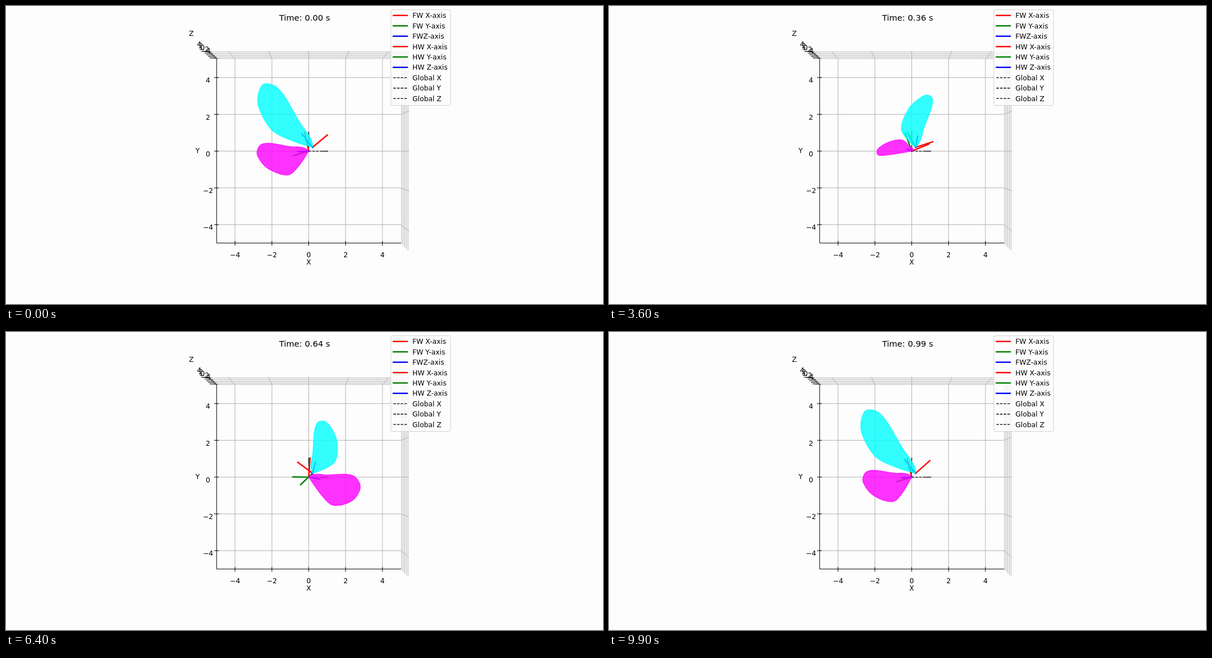
Animation of 1058x529 px, one loop 10 s. Source, as an HTML page with a canvas:

```html
<!DOCTYPE html>
<html lang="en">
<head>
<meta charset="utf-8">
<title>Wing kinematics</title>
<style>
  html, body { margin: 0; width: 100%; height: 100%; overflow: hidden; background: #fdfdfd; }
  canvas { display: block; }
</style>
</head>
<body>
<canvas width="1058" height="529"></canvas>
<script>
const ctx = document.querySelector('canvas').getContext('2d');
const TICKS = [-4, -2, 0, 2, 4];
const GRID = '#b0b0b0';
const CENTER = { x: 536.5, y: 257.6 };

// Periodic motion: a mean plus [cosine, sine] amplitudes of successive harmonics.
const wave = (mean, ...harmonics) => t => harmonics.reduce((sum, [a, b], i) => {
  const angle = 2 * Math.PI * (i + 1) * t;
  return sum + a * Math.cos(angle) + b * Math.sin(angle);
}, mean);

// Key points of the wing outline as [span, chord]; both wings share the leading edge and tip.
const LEADING = [[0, 0], [.3, .17], [.9, .25], [1.6, .28], [3.2, .49], [4.05, .45], [4.5, .16],
  [4.57, -.14], [4.22, -.62]];

// spanX, spanY: top view of the unit span vector. pitch: rotation about the span in degrees.
const hindWing = {
  color: '#f0f', root: [0, 0, 0],
  outline: [...LEADING, [3.6, -.95], [2.7, -1.18], [2, -1.15], [1, -.66]],
  spanX: wave(-.117, [-.455, -.527], [.015, .007], [-.013, .008]),
  spanY: wave(.002, [.02, .178], [-.046, .035]),
  pitch: wave(72.4, [29.8, -34.7], [2.4, 5.8])
};
const foreWing = {
  color: '#0ff', root: [.2, .2, 0],
  outline: [...LEADING, [3.74, -.9], [2.75, -1.1], [1.93, -1.02], [.8, -.49]],
  spanX: wave(-.152, [-.454, .007], [.052, .022]),
  spanY: wave(.595, [.063, .025], [.021, .008], [.022, -.014]),
  pitch: wave(63.5, [-27, -67.5], [-13.5, 6.2])
};
const wings = [hindWing, foreWing];

// Perspective view straight down the z axis.
function project([x, y, z]) {
  const scale = 34 / (1 - .0083 * z);
  return [CENTER.x + x * scale, CENTER.y - y * scale];
}

const along = (root, ...terms) =>
  root.map((r, i) => r + terms.reduce((sum, [amount, axis]) => sum + amount * axis[i], 0));

function wingAxes(wing, t) {
  const zx = wing.spanX(t), zy = wing.spanY(t);
  const zz = Math.sqrt(Math.max(0, 1 - zx * zx - zy * zy));
  const n = Math.hypot(zy, zz);
  const angle = wing.pitch(t) * Math.PI / 180, c = Math.cos(angle), s = Math.sin(angle);
  const u = [n, -zx * zy / n, -zx * zz / n], v = [0, zz / n, -zy / n];
  return {
    x: u.map((_, i) => c * u[i] + s * v[i]),
    y: u.map((_, i) => c * v[i] - s * u[i]),
    z: [zx, zy, zz]
  };
}

function line(points, color, width, dash = []) {
  ctx.strokeStyle = color;
  ctx.lineWidth = width;
  ctx.lineCap = dash.length ? 'butt' : 'square';
  ctx.setLineDash(dash);
  ctx.beginPath();
  points.forEach(p => ctx.lineTo(...p));
  ctx.stroke();
  ctx.setLineDash([]);
}

const line3 = (points, ...style) => line(points.map(project), ...style);
const solid = color => [color, 2.45];
const dashed = ['#000', 1.3, [4.5, 2]];

function text(string, x, y, align = 'center', size = 12.25) {
  ctx.fillStyle = '#000';
  ctx.font = `${size}px "DejaVu Sans", sans-serif`;
  ctx.textAlign = align;
  ctx.fillText(string, x, y + size * .365);
}

function drawAxes() {
  for (const v of TICKS) {
    line3([[v, -5, -5], [v, 5, -5], [v, 5, 5]], GRID, 1);
    line3([[-5, v, -5], [5, v, -5], [5, v, 5]], GRID, 1);
    line3([[-5, 5, v], [5, 5, v], [5, -5, v]], GRID, 1);
  }
  line3([[5, -5, -5], [-5, -5, -5], [-5, 5, -5], [-5, 5, 5]], '#000', 1);
  for (const v of TICKS) {
    const label = String(v).replace('-', '\u2212');
    const [x] = project([v, -5, -5]), [, y] = project([-5, v, -5]), [zx, zy] = project([-5, 5, v]);
    line([[x, 417.5], [x, 425]], '#000', 1);
    line([[369, y], [376.5, y]], '#000', 1);
    line([[zx - 11, zy - 1], [zx + 3, zy]], '#000', 1);
    text(label, x, 441.3);
    text(label, 358, y + 4.8);
    text(label, zx - 18.2, zy - 13.8);
  }
  text('X', 536.5, 454.2);
  text('Y', 339.5, 256.8);
  text('Z', 328.5, 48.3);
}

function drawGlobalAxes() {
  for (const axis of [[1, 0, 0], [0, 1, 0]]) {
    line3([[0, 0, 0], axis], ...dashed);
    line3([axis, axis.map(v => v * .71)], ...dashed);
  }
}

function drawWing(wing, axes) {
  const p = wing.outline.map(([s, c]) => project(along(wing.root, [s, axes.z], [c, axes.x])));
  const at = i => p[(i + p.length) % p.length];
  ctx.beginPath();
  ctx.moveTo(...p[0]);
  for (let i = 0; i < p.length; i++) {
    const a = at(i), b = at(i + 1);
    // The root corner stays sharp.
    const before = i === 0 ? a : at(i - 1), after = i === p.length - 1 ? b : at(i + 2);
    ctx.bezierCurveTo(
      a[0] + (b[0] - before[0]) / 6, a[1] + (b[1] - before[1]) / 6,
      b[0] - (after[0] - a[0]) / 6, b[1] - (after[1] - a[1]) / 6, ...b);
  }
  ctx.closePath();
  ctx.globalAlpha = .8;
  ctx.fillStyle = ctx.strokeStyle = wing.color;
  ctx.lineWidth = 1.2;
  ctx.lineJoin = 'round';
  ctx.fill();
  ctx.stroke();
  ctx.globalAlpha = 1;
}

function drawLegend() {
  ctx.beginPath();
  ctx.roundRect(682, 6.7, 105.7, 169.8, 2.5);
  ctx.fillStyle = 'rgba(254,254,254,.8)';
  ctx.strokeStyle = '#d2d2d2';
  ctx.lineWidth = 1;
  ctx.fill();
  ctx.stroke();
  const names = ['FW X-axis', 'FW Y-axis', 'FWZ-axis', 'HW X-axis', 'HW Y-axis', 'HW Z-axis',
    'Global X', 'Global Y', 'Global Z'];
  names.forEach((name, i) => {
    const y = 16.8 + i * 18.42;
    const style = i < 6 ? solid(['red', 'green', 'blue'][i % 3]) : dashed;
    line([[686.5, y], [711, y]], ...style);
    text(name, 720.3, y, 'left');
  });
}

function draw(t) {
  ctx.fillStyle = '#fdfdfd';
  ctx.fillRect(0, 0, 1058, 529);
  drawAxes();
  drawGlobalAxes();
  const poses = wings.map(wing => wingAxes(wing, t));
  wings.forEach(({ root }, i) => {
    const { x, y, z } = poses[i];
    [[x, 'red'], [y, 'green'], [z, 'blue']].forEach(([axis, color]) =>
      line3([root, along(root, [1, axis])], ...solid(color)));
  });
  wings.forEach((wing, i) => drawWing(wing, poses[i]));
  drawLegend();
  text(`Time: ${t.toFixed(2)} s`, 529.2, 20.9, 'center', 14.7);
}

function tick() {
  draw(Math.floor(performance.now() / 100) % 100 / 100);
  requestAnimationFrame(tick);
}
tick();
</script>
</body>
</html>
```
